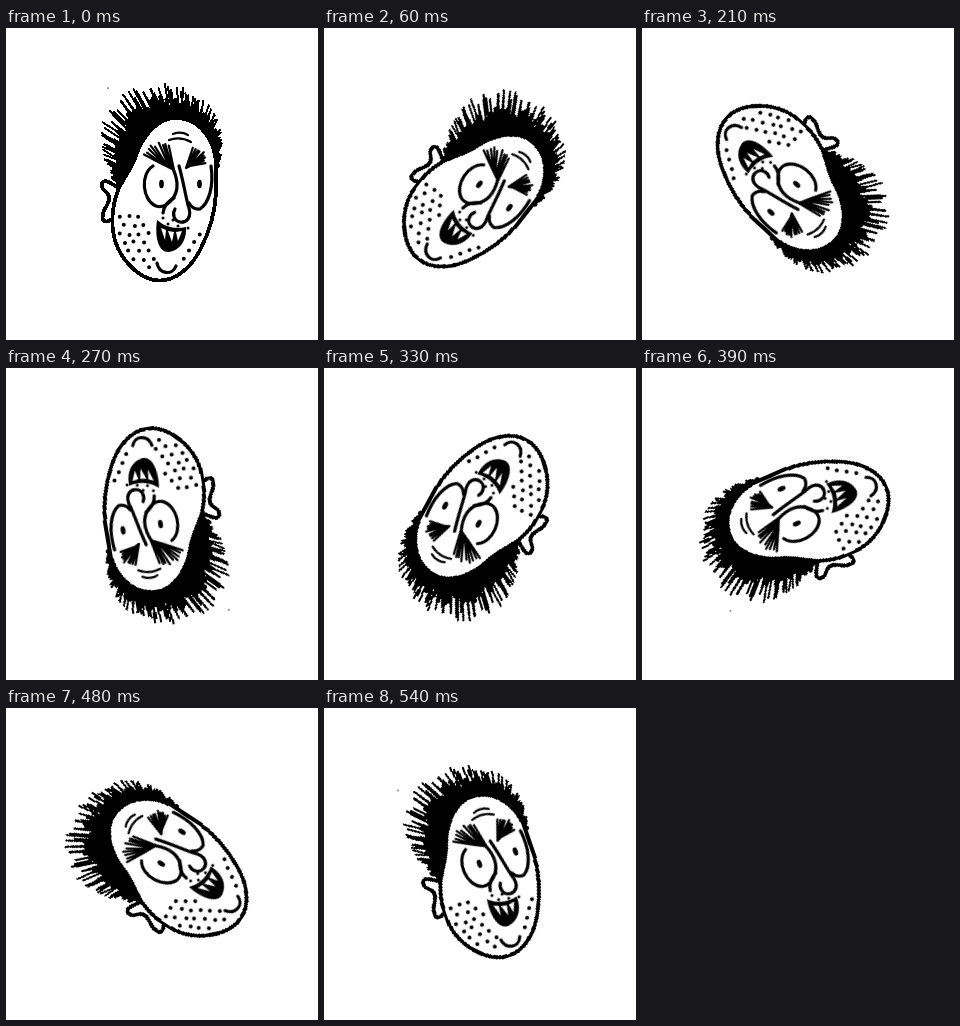
Recreate the animation shown at these times as an HTML page. Size 312x312 px, loop 0.57 s.

```html
<!DOCTYPE html>
<html lang="en">
<head>
<meta charset="utf-8">
<title>Spinning head</title>
<style>
  html, body { margin: 0; width: 100%; height: 100%; overflow: hidden; background: #fff; }
  svg { display: block; width: 100vw; height: 100vh; }
  #head {
    fill: none; stroke: #000; stroke-linecap: round; stroke-linejoin: round;
    transform-origin: 155px 156px;
    animation: spin 570ms steps(19, end) infinite;
  }
  .edge { fill: #fff; stroke-width: 3.8; shape-rendering: crispEdges; }
  #hair { shape-rendering: crispEdges; }
  .ink { fill: #000; stroke: none; }
  .white { fill: #fff; stroke: none; }
  @keyframes spin { to { transform: rotate(360deg); } }
</style>
</head>
<body>
<svg viewBox="0 0 312 312">
  <clipPath id="box"><rect x="56" y="55" width="198" height="205"/></clipPath>
  <g clip-path="url(#box)">
    <g id="head">
      <path class="edge" d="M113 160C108 158 104 153 99 153C94 154 95 160 99 163C104 167 104 172 101 177C97 183 95 190 98 193C103 195 108 190 112 183"/>
      <path class="edge" d="M153 252.5C169 253 185 240 194 222C204 203 209 185 210 165C211 140 211 122 202 109C194 96 182 90 169 90C152 90 137 108 131 125C126 140 118 150 114 158C108 170 105 188 107 203C110 228 132 252 153 252.5Z"/>
      <g id="hair"></g>

      <path stroke-width="2.2" d="M163 112Q174 108 185 114M167 106Q175 103 182 107"/>
      <g stroke-width="3.2">
        <path d="M147 138C134 146 136 172 150 178C160 181 172 170 171 155Q170 146 166 139"/>
        <path d="M205 138C208 158 203 175 194 181Q187 182 183 175"/>
        <path d="M173 138C177 152 179 165 182 177C187 190 180 195 174 194C168 193 166 186 169 181"/>
        <path d="M157 185C158 177 162 173 168 170"/>
        <path d="M151 235C153 246 166 248 170 238"/>
      </g>
      <ellipse class="ink" cx="155.5" cy="156" rx="2.4" ry="4.2"/>
      <ellipse class="ink" cx="193.5" cy="156" rx="2.4" ry="4.2"/>
      <g id="brows"></g>

      <path class="ink" d="M151 192Q164 203 180 199C181 214 172 224 161 224C151 222 149 206 151 192Z"/>
      <path class="white" d="M155 200L160 202L159 212ZM162 203L168 204L166 214ZM170 204L176 203L172 213Z"/>

      <path id="stubble" stroke-width="4"/>
      <path id="lip" stroke-width="3"/>
      <rect class="ink" x="101.5" y="59.5" width="1.2" height="1.2"/>
    </g>
  </g>
</svg>
<script>
  const $ = id => document.getElementById(id);

  let seed = 17;
  const rnd = () => (seed = seed * 16807 % 2147483647) / 2147483647;

  function path(d, parent, width) {
    const p = document.createElementNS('http://www.w3.org/2000/svg', 'path');
    p.setAttribute('d', d);
    if (width) p.setAttribute('stroke-width', width);
    if (parent) parent.append(p);
    return p;
  }
  const at = (p, t) => p.getPointAtLength(p.getTotalLength() * Math.min(1, Math.max(0, t)));
  const mix = (a, b, k) => (a + (b - a) * k).toFixed(1);

  // Strands run from a root curve towards a tip curve.
  function strands(root, tip, { count, lean, min, max, width, parent }) {
    const a = path(root), b = path(tip);
    let d = '';
    for (let i = 0; i <= count; i++) {
      const t = i / count, k = min + rnd() * (max - min);
      const p = at(a, t), q = at(b, t + (rnd() - 0.5) * lean);
      d += `M${p.x.toFixed(1)} ${p.y.toFixed(1)}L${mix(p.x, q.x, k)} ${mix(p.y, q.y, k)}`;
    }
    path(d, parent, width);
  }

  const hairline = 'M114 156C122 138 130 125 133 118C140 100 152 90 169 90C186 90 198 100 204 112C209 122 210 130 210 138';
  const contour = 'M108 154C91 125 90 92 107 75C125 58 150 55 170 57C195 61 212 85 215 105C217 118 216 128 213 139';
  const hair = $('hair');
  strands(hairline, contour, { count: 90, lean: 0.02, min: 0.4, max: 0.65, width: 3.4, parent: hair });
  strands(hairline, contour, { count: 76, lean: 0.05, min: 0.75, max: 1.02, width: 2, parent: hair });

  const brow = { count: 8, lean: 0.06, min: 0.8, max: 1, width: 2.2, parent: $('brows') };
  strands('M156 136L168 142', 'M137 126C139 116 152 110 163 117', brow);
  strands('M180 140L184 138', 'M187 119C195 117 203 122 200 135', brow);

  const inside = (x, y, cx, cy, rx, ry) => ((x - cx) / rx) ** 2 + ((y - cy) / ry) ** 2 < 1;
  const dot = (x, y) => `M${x.toFixed(1)} ${y.toFixed(1)}h.01`;

  let stubble = '';
  for (let row = 0; row < 7; row++) {
    for (let col = 0; col < 10; col++) {
      const x = 112 + col * 10 + row % 2 * 5 + rnd() * 2;
      const y = 188 + row * 8.5 + rnd() * 2;
      const cheek = y > 184 + (x - 115) / 4;
      const jaw = inside(x, y, 156, 190, 45, 56);
      const mouth = inside(x, y, 164, 206, 20, 22);
      const chin = inside(x, y, 160, 239, 13, 10);
      if (cheek && jaw && !mouth && !chin) stubble += dot(x, y);
    }
  }
  $('stubble').setAttribute('d', stubble);

  let lip = '';
  for (let i = 0; i < 6; i++) lip += dot(157 + i * 5, 190 + i + i % 2 * 5);
  $('lip').setAttribute('d', lip);
</script>
</body>
</html>
```
